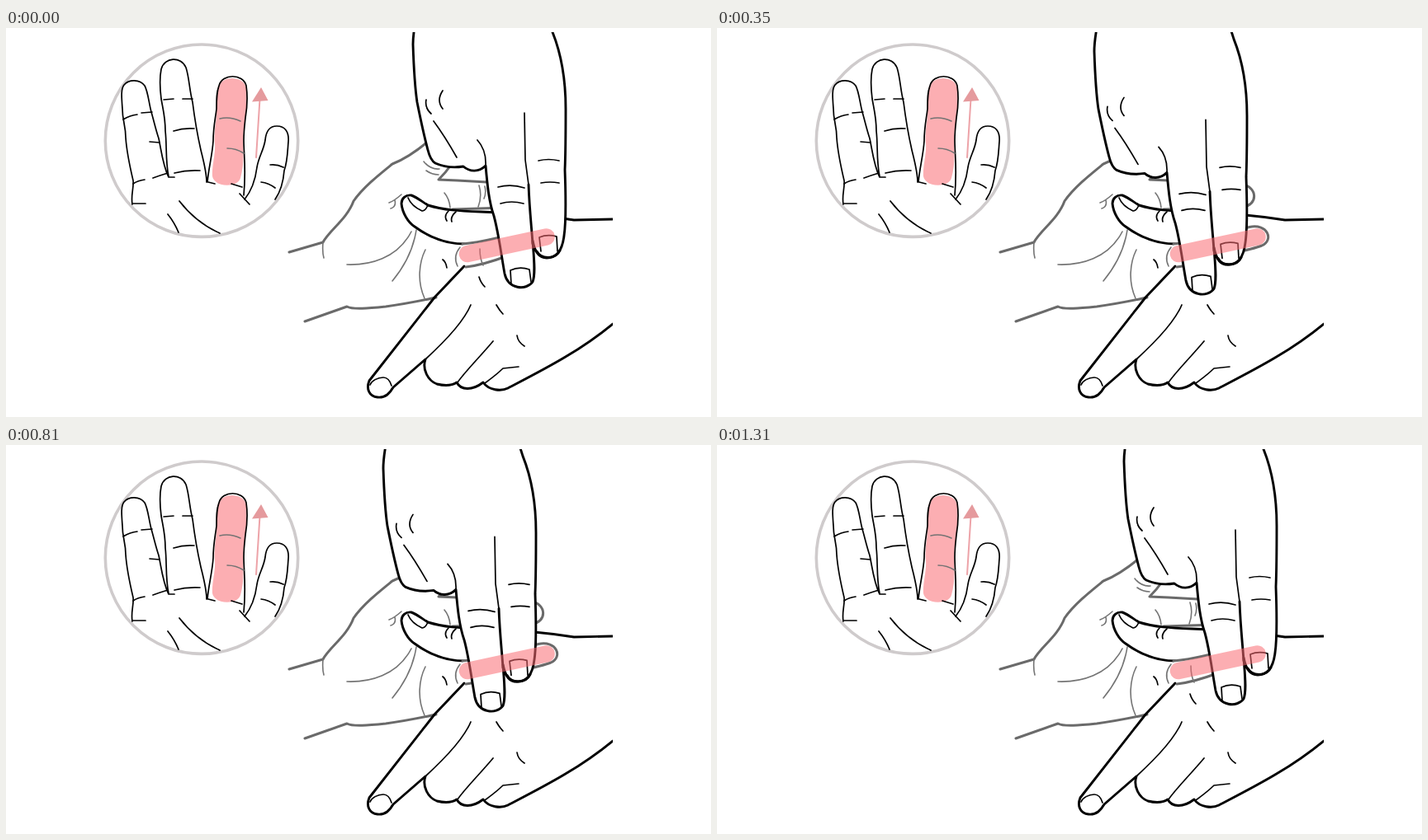
Recreate the animation shown at these times as an HTML page. Size 854x472 px, loop 1.39 s.

```html
<!DOCTYPE html>
<html lang="en">
<head>
<meta charset="utf-8">
<title>Finger stroke</title>
<style>
html, body { margin: 0; width: 100%; height: 100%; overflow: hidden; background: #fff; }
svg { display: block; width: 100vw; height: 100vh; }
path, line { fill: none; stroke-linecap: round; stroke-linejoin: round; }
.bold { stroke: #000; stroke-width: 2.9; }
.fine { stroke: #000; stroke-width: 1.7; }
.grey { stroke: #6a6a6a; stroke-width: 3; }
.soft { stroke: #747474; stroke-width: 1.6; }
.skin { fill: #fff; }
.tint { fill: #fa6c73; opacity: .55; }
.band { stroke: #fa6c73; stroke-width: 20.6; opacity: .55; }
</style>
</head>
<body>
<svg viewBox="0 0 854 472">
  <defs><clipPath id="page"><rect x="97" y="5" width="638" height="462"/></clipPath></defs>

  <g id="inset">
    <circle cx="237" cy="136.7" r="116.7" fill="#fff" stroke="#cfcbcc" stroke-width="3.6"/>
    <path class="tint" d="M256 75C258 57 287 57 291 72C292 86 291 100 290 109C288 120 287 130 287 140C288 156 288 167 284 182C281 194 253 194 250 180C249 168 254 154 253 140C251 124 256 110 255 97Z"/>
    <path class="fine" d="M153 214C151 203 155 194 154 185C150 168 146 148 145 133C145 118 141 113 141 98C140 84 139 74 143 69C149 62 162 62 168 70C172 77 173 91 176 102C179 112 181 122 185 134C188 148 190 167 197 181L204 181
      M197 180C193 162 195 142 193 125C193 108 190 98 188 86C186 70 186 60 188 50C192 35 212 34 218 48C222 60 222 75 226 90C228 106 231 126 236 148C240 164 243 175 243 187
      M244 187C245 172 250 154 251 137C251 120 254 108 255 98C255 86 255 78 258 70C262 55 287 55 291 70C293 84 292 97 290 109C289 118 288 126 288 136C288 152 291 172 288 203
      M283 201L295 214M289 208C297 198 302 185 304 169C306 156 312 149 314 136C315 125 320 119 328 119C338 119 343 126 342 138C341 150 341 162 337 173C336 186 333 198 326 208"/>
    <path class="fine" d="M142 111Q150 106 159 105M164 103L177 102M174 138L186 139M154 189Q160 185 168 184M178 182Q186 179 196 176M153 213L169 213
      M191 87L203 86M214 86L226 86M203 125Q215 121 228 122M204 176Q219 172 235 173
      M245 187L253 189M273 189L286 193
      M309 187Q318 188 326 194M320 166Q328 165 336 169M210 210Q230 236 259 249M196 226Q204 236 209 248"/>
    <path class="soft" d="M259 110Q271 107 284 113M268 146Q279 146 288 152"/>
    <line x1="303" y1="157" x2="307.5" y2="86" stroke="#eda3a8" stroke-width="2"/>
    <path d="M309 72L317.5 88L298 89.5Z" style="fill:#e59a9d"/>
  </g>

  <g clip-path="url(#page)">
    <g id="palm">
      <path class="grey" d="M343 272L384 260C391 246 413 232 421 210C433 193 452 178 468 165C488 157 508 141 520 130C528 117 530 104 541 104C553 105 556 127 549 148C543 163 533 175 524 184L547 185L636 190C655 192 656 216 636 217L541 220
        M362 356L413 338C420 342 440 340 460 338C482 335 502 331 521 327"/>
      <path class="soft" d="M384 260Q383 272 385 279M413 287C440 288 474 280 491 247M468 307Q492 278 497 245M507 328C498 308 500 285 508 269
        M506 162Q514 172 525 171M509 173Q516 178 524 178M464 212Q470 210 479 202M466 219Q473 217 471 209
        M573 191Q577 204 572 217M580 192Q582 200 579 207M607 192Q605 200 608 208M612 192Q611 199 613 206M531 200Q537 207 538 218"/>
    </g>
    <g id="lower">
      <path class="bold" d="M735 232L688 233C650 227 610 224 575 223C550 222 530 221 511 215C503 210 497 205 491 203C484 202 479 207 479 213C480 224 487 236 495 241C506 249 528 262 555 262
        M555 289L519 327L440 428C436 438 440 447 450 448C460 449 465 443 469 436L508 402C504 414 511 428 522 432C530 434 540 434 546 430C551 440 565 440 578 430C585 440 600 441 608 437C650 415 694 393 735 359"/>
      <path class="fine" d="M487 206Q491 216 504 222Q508 222 511 215M536 222Q530 228 534 234M545 223Q538 229 540 235
        M508 402C532 380 555 355 563 336M547 430C555 418 575 398 590 380M580 431Q595 420 602 413L621 411
        M441 433C443 428 450 424 457 424Q464 424 467 434M573 302Q575 309 580 314M594 336Q598 343 602 347M619 373Q620 381 628 386M529 281Q533 284 534 291"/>
      <path class="grey skin" d="M553 262C575 260 590 256 606 252L645 241.5C667 237 675 257 660 264C645 270 622 273 606 277C590 283 575 288 557 290"/>
      <path class="soft" d="M550 266Q541 277 547 289M574 268Q574 280 578 288M614 259Q616 268 619 273"/>
    </g>
    <g id="upper">
      <path class="bold skin" d="M503 -45C497 -15 493 5 493 20C494 50 495 70 498 90C502 110 507 133 511 148C513 156 515 161 520 164C529 168 541 170 554 168C562 175 573 175 581 167C583 190 585 211 591 228C597 250 600 276 604 298C608 317 630 319 638 308C642 298 639 275 638 258C641 273 646 279 655 279C668 279 674 269 676 252C679 232 678 200 677 172C678 148 678 126 678 98C678 62 672 30 662 5C658 -8 654 -20 645 -45"/>
      <path class="bold" d="M638 262C637 245 634 220 633 190M643 271C648 281 666 281 671 270"/>
      <path class="fine" d="M633 190L629 160L628 103M571 136Q582 148 581 167M518 113Q532 132 546 157
        M509 87Q507 97 515 104M529 76Q521 88 529 98
        M612 311L611 294Q622 289 634 293L636 308M648 271L646 254Q656 250 667 253L668 271
        M596 193Q612 189 628 194M599 213Q612 209 627 213M645 161Q657 158 670 161M648 188Q659 186 670 188"/>
    </g>
    <path class="band" d="M559 274L654.5 253.5"/>
  </g>
</svg>
<script>
const LOOP = 1390, START = 2;
// Moments at which the hand moves on by one place, six places per stroke
const beats = [60, 140, 230, 290, 350, 430, 530, 570, 650, 730, 810, 870, 950, 1030, 1110, 1170, 1250, 1310];
const hand = document.getElementById("upper");

function draw(ms) {
  const t = ms % LOOP;
  const count = beats.filter(b => b <= t).length;
  const place = (START - count + 18) % 6;
  const d = START - place;
  hand.setAttribute("transform", `translate(${d * 36} ${d * -8.4})`);
}

const begin = performance.now();
function tick() {
  draw(performance.now() - begin);
  requestAnimationFrame(tick);
}
tick();
</script>
</body>
</html>
```
